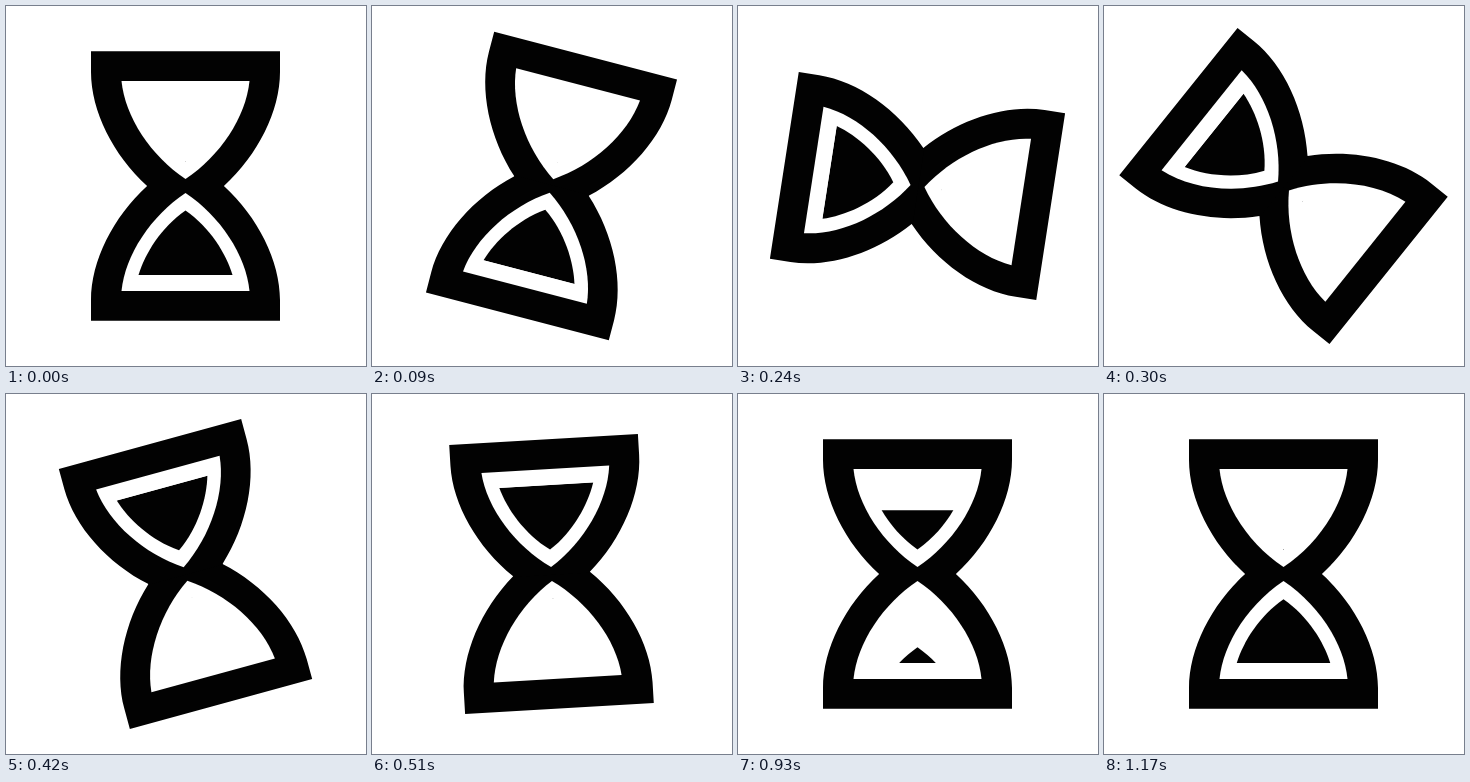
Animation, 360 px wide and 360 px high, one loop 1200 ms. Source, as an HTML page:

```html
<!DOCTYPE html>
<html lang="en">
<head>
<meta charset="utf-8">
<title>Hourglass</title>
<style>
  html, body { margin: 0; width: 100%; height: 100%; overflow: hidden; background: #fff; }
  svg { display: block; width: 100vw; height: 100vh; }
</style>
</head>
<body>
<svg viewBox="0 0 360 360">
  <defs>
    <path id="bulb" d="M-64-105H64C60.5-69 34.5-30 0-7C-34.5-30-60.5-69-64-105Z"/>
    <path id="sand" d="M-47-89H47C40.5-67.5 24.5-41.5 0-24.5C-24.5-41.5-40.5-67.5-47-89Z"/>
    <path id="half" d="M-94.5-134.75H94.5V-114C94.5-75 72.4-31 38.4 0V1H-38.4V0C-72.4-31-94.5-75-94.5-114Z"/>
    <clipPath id="above"><rect id="level" x="-60" width="120" height="100"/></clipPath>
    <clipPath id="floor"><rect x="-60" y="0" width="120" height="89"/></clipPath>
  </defs>
  <g id="glass" fill="#020202">
    <use href="#half"/>
    <use href="#half" transform="scale(1 -1)"/>
    <use href="#bulb" fill="#fff"/>
    <use href="#bulb" fill="#fff" transform="scale(1 -1)"/>
    <g clip-path="url(#above)"><use href="#sand"/></g>
    <g clip-path="url(#floor)"><use id="pile" href="#sand"/></g>
  </g>
</svg>
<script>
  const LOOP = 1200, TURN = 600, STEP = 30;
  const SAND_TOP = -89, SAND_DEPTH = 64.5, PILE_RISE = 80;
  const get = id => document.getElementById(id);
  const glass = get('glass'), level = get('level'), pile = get('pile');

  // Cubic easing through (a, 0) and (b, 1), solved by bisection.
  function ease(a, b, x) {
    if (x <= 0) return 0;
    if (x >= 1) return 1;
    let lo = 0, hi = 1;
    for (let i = 0; i < 30; i++) {
      const s = (lo + hi) / 2, r = 1 - s;
      if (3 * a * s * r * r + 3 * b * s * s * r + s ** 3 < x) lo = s;
      else hi = s;
    }
    return lo * lo * (3 - 2 * lo);
  }

  function draw(time) {
    const t = Math.floor((time % LOOP) / STEP) * STEP;
    const turning = t < TURN;
    const angle = turning ? 180 * ease(1 / 3, 1 / 3, t / TURN) : 0;
    const flow = turning ? 1 : ease(0.6, 0.7, (t - TURN) / (LOOP - TURN));

    glass.setAttribute('transform', `translate(179.5 180) rotate(${angle})`);
    level.setAttribute('y', SAND_TOP + SAND_DEPTH * flow);
    pile.setAttribute('transform', `translate(0 ${PILE_RISE * (1 - flow)}) scale(1 -1)`);
  }

  const start = performance.now();
  function tick() {
    draw(performance.now() - start);
    requestAnimationFrame(tick);
  }
  draw(0);
  requestAnimationFrame(tick);
</script>
</body>
</html>
```
